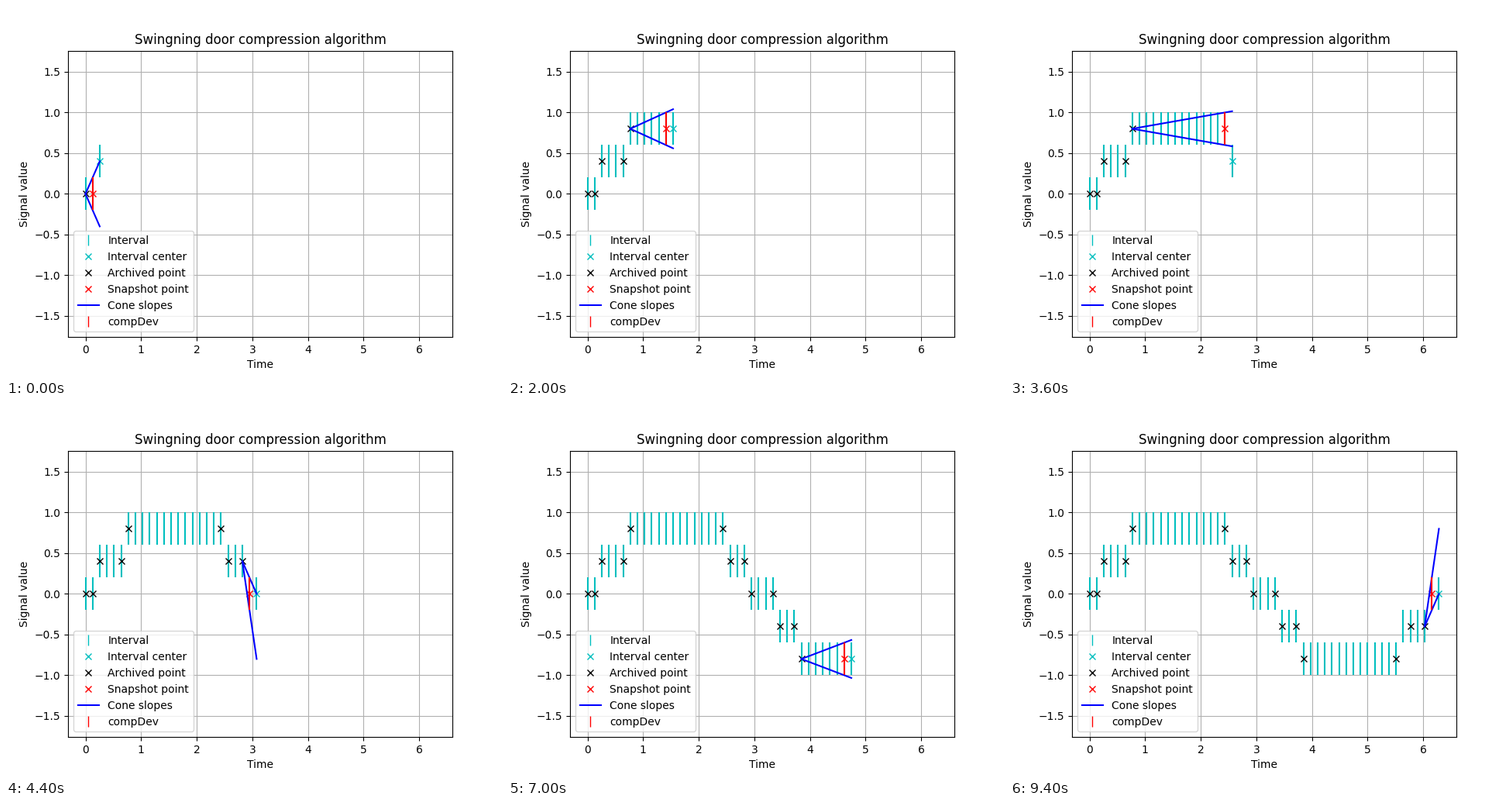
Animation of 640 by 480 pixels, one loop 9.6 s. Source, as a matplotlib script:

```python
import numpy as np
import matplotlib.pyplot as plt
from matplotlib.animation import FuncAnimation
from matplotlib.lines import Line2D

COMP_DEV = 0.2
STEP = 0.4
t = np.linspace(0, 2 * np.pi, 50)
y = np.round(np.sin(t) / STEP) * STEP

# Samples that the algorithm keeps
ARCHIVED = np.array([0, 1, 2, 5, 6, 19, 20, 22, 23, 26, 27, 29, 30, 43, 45, 47])

fig, ax = plt.subplots(figsize=(6.4, 4.8), dpi=100)
ax.set_title("Swingning door compression algorithm")
ax.set_xlabel("Time")
ax.set_ylabel("Signal value")
ax.set_xlim(-0.1 * np.pi, 2.1 * np.pi)
ax.set_ylim(-1.76, 1.76)
ax.grid(True)


def marks(color):
    return ax.plot([], [], "x", color=color)[0]


def bars(color):
    return ax.vlines([0], -COMP_DEV, COMP_DEV, colors=color)


intervals = bars("c")
center = marks("c")
archived = marks("k")
snapshot = marks("r")
cone = [ax.plot([], [], "b-")[0] for _ in range(2)]
dev = bars("r")


def handle(label, color, marker=None, line="None", size=6):
    return Line2D([], [], color=color, marker=marker, linestyle=line,
                  markersize=size, label=label)


ax.legend(handles=[
    handle("Interval", "c", "|", size=10),
    handle("Interval center", "c", "x"),
    handle("Archived point", "k", "x"),
    handle("Snapshot point", "r", "x"),
    handle("Cone slopes", "b", line="-"),
    handle("compDev", "r", "|", size=10),
], loc="lower left")


def segments(idx):
    return [[(t[i], y[i] - COMP_DEV), (t[i], y[i] + COMP_DEV)] for i in idx]


def cone_slopes(start, snap):
    """Tightest slopes from the archived point through all later intervals."""
    j = np.arange(start + 1, snap + 1)
    dt = t[j] - t[start]
    rise = y[j] - y[start]
    return np.max((rise - COMP_DEV) / dt), np.min((rise + COMP_DEV) / dt)


def update(frame):
    new = frame + 2
    snap = new - 1
    kept = ARCHIVED[ARCHIVED < snap]
    start = kept[-1]

    intervals.set_segments(segments(range(new + 1)))
    dev.set_segments(segments([snap]))
    center.set_data([t[new]], [y[new]])
    archived.set_data(t[kept], y[kept])
    snapshot.set_data([t[snap]], [y[snap]])
    for line, slope in zip(cone, cone_slopes(start, snap)):
        end = y[start] + slope * (t[new] - t[start])
        line.set_data([t[start], t[new]], [y[start], end])
    return [intervals, center, archived, snapshot, *cone, dev]


anim = FuncAnimation(fig, update, frames=len(t) - 2, interval=200, repeat=True)
plt.show()
```
